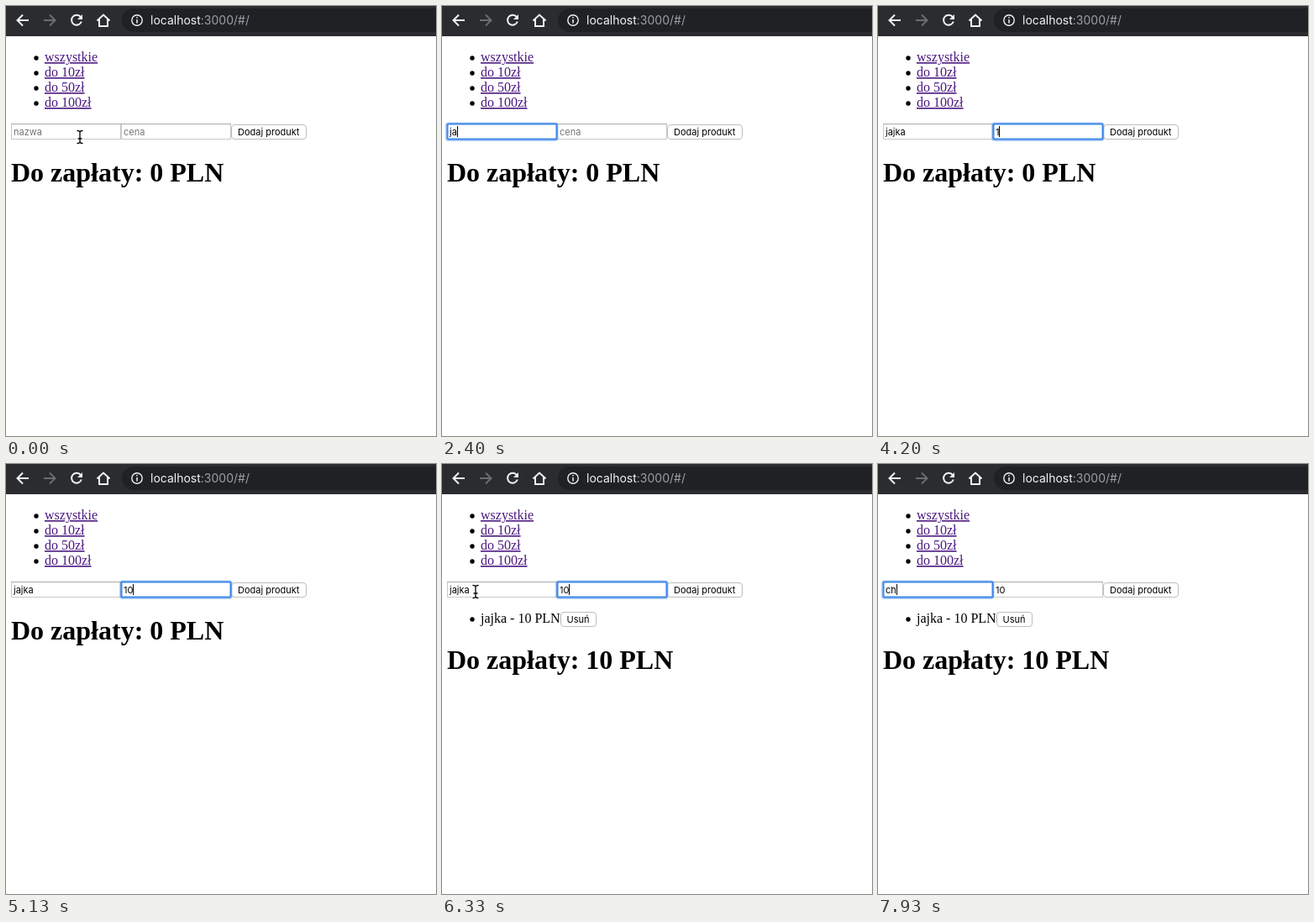
Write an HTML page that moves like this. It is 512 px wide and 512 px high and loops after 8 s.

```html
<!DOCTYPE html>
<html lang="pl">
<head>
<meta charset="utf-8">
<style>
  html, body { margin: 0; width: 100%; height: 100%; overflow: hidden; background: #fff; }
  svg { display: block; width: 512px; height: 512px; }
  .page { font: 16px "Liberation Serif", serif; }
  .links { fill: #4b1880; text-decoration: underline; }
  h1, .total { font: bold 32px "Liberation Serif", serif; }
  .ui { font: 11px Inter, sans-serif; }
  .url { font: 14px Inter, sans-serif; fill: #9aa0a6; }
  .icon { fill: none; stroke: #f1f3f4; stroke-width: 2; }
  .button { fill: #fff; stroke: #bdbdbd; }
</style>
</head>
<body>
<svg viewBox="0 0 512 512">
  <rect width="512" height="36" fill="#2b2c30"/>
  <rect x="138" y="3" width="400" height="28" rx="14" fill="#202124"/>
  <g class="icon">
    <path d="M27 17H14M20 10.5L13.5 17L20 23.5"/>
    <path d="M45 17H58M52 10.5L58.5 17L52 23.5" stroke="#6c6d71"/>
    <path d="M89 13.2A6 6 0 1 0 89.8 18.5"/>
    <path d="M91 10V16H85Z" fill="#f1f3f4" stroke="none"/>
    <path d="M108.500 17.500L116 10.500L123.500 17.500M111 16V24H121V16"/>
    <circle cx="156" cy="17" r="6.200" stroke-width="1.400"/>
    <path d="M156 16V20.500M156 13V14.600" stroke-width="1.500"/>
  </g>
  <text class="url" x="172" y="22"><tspan fill="#f1f3f4">localhost</tspan>:3000/#/</text>

  <g class="page">
    <g class="links">
      <text x="46" y="66">wszystkie</text>
      <text x="46" y="84">do 10zł</text>
      <text x="46" y="102">do 50zł</text>
      <text x="46" y="120">do 100zł</text>
    </g>
    <circle cx="36" cy="62" r="2.700"/>
    <circle cx="36" cy="80" r="2.700"/>
    <circle cx="36" cy="98" r="2.700"/>
    <circle cx="36" cy="116" r="2.700"/>
    <g id="item">
      <circle cx="36" cy="185" r="2.700"/>
      <text x="46" y="189">jajka - 10 PLN</text>
      <rect class="button" x="141.500" y="176.500" width="42" height="17" rx="3.500"/>
      <text class="ui" x="148.500" y="189">Usuń</text>
    </g>
  </g>
  <text id="total" class="total" x="6"></text>

  <g class="ui">
    <g fill="none" stroke="#c8c8c8">
      <rect x="6.500" y="140.500" width="130" height="18"/>
      <rect x="137.500" y="140.500" width="130" height="18"/>
      <path d="M6 140.500H268" stroke="#a9a9a9"/>
    </g>
    <rect class="button" x="268.500" y="141.500" width="89" height="17" rx="3.500"/>
    <text x="276" y="154">Dodaj produkt</text>
    <g id="ring" fill="none" stroke="#3f87e8">
      <rect x="6" y="140.500" width="130.500" height="18.500" rx="1.500" stroke-width="4" opacity=".4"/>
      <rect x="6.500" y="140.500" width="130" height="18" rx="1" fill="#fff" stroke-width="2"/>
    </g>
    <rect id="selection" y="143" height="13" fill="#b3d7fe"/>
    <text id="name" x="9" y="154"></text>
    <text id="price" x="140" y="154"></text>
    <rect id="caret" y="143" width="1" height="13"/>
  </g>
  <g id="pointer" fill="none" stroke-linecap="round">
    <path id="beam" d="M-3 -7.500Q0 -7.500 0 -5.500Q0 -7.500 3 -7.500M0 -5.500V5.500M-3 7.500Q0 7.500 0 5.500Q0 7.500 3 7.500M-2 2H2" stroke="#fff" stroke-width="3"/>
    <use href="#beam"/>
    <path d="M-3 -7.500Q0 -7.500 0 -5.500Q0 -7.500 3 -7.500M0 -5.500V5.500M-3 7.500Q0 7.500 0 5.500Q0 7.500 3 7.500M-2 2H2" stroke="#000" stroke-width="1.300"/>
  </g>
</svg>
<script>
const $ = id => document.getElementById(id);
const LOOP = 8000, ADDED = 5400;

// [time, focused field, name, price, selection start]
const states = [
  [0, '', '', ''],
  [930, 'name', '', ''],
  [1930, 'name', 'j', ''],
  [2270, 'name', 'ja', ''],
  [2530, 'name', 'jaj', ''],
  [2670, 'name', 'jajk', ''],
  [2800, 'name', 'jajka', ''],
  [3400, 'price', 'jajka', ''],
  [3930, 'price', 'jajka', '1'],
  [4870, 'price', 'jajka', '10'],
  [6400, 'name', 'jajka', '10'],
  [6600, 'name', 'jajka', '10', 4],
  [6670, 'name', 'jajka', '10', 3],
  [6800, 'name', 'jajka', '10', 0],
  [7470, 'name', 'c', '10'],
  [7730, 'name', 'ch', '10']
];

// [time, x, y]
const path = [
  [0, 88, 156], [800, 89, 158], [6000, 89, 158], [6330, 40, 152],
  [6530, 36, 150], [6730, 10, 146], [6870, 8, 148], [8000, 8, 148]
];

function pointerAt(t) {
  const i = path.findIndex(p => p[0] > t);
  const [a, b] = [path[i - 1], path[i]];
  const k = (t - a[0]) / (b[0] - a[0]);
  return [a[1] + (b[1] - a[1]) * k, a[2] + (b[2] - a[2]) * k];
}

const show = (id, on) => $(id).setAttribute('visibility', on ? 'visible' : 'hidden');

function setField(id, value, hint) {
  $(id).textContent = value || hint;
  $(id).setAttribute('fill', value ? '#000' : '#757575');
}

function draw(t) {
  const [start, focus, name, price, from] = states.findLast(s => s[0] <= t);
  setField('name', name, 'nazwa');
  setField('price', price, 'cena');

  show('ring', focus);
  $('ring').setAttribute('transform', `translate(${focus === 'price' ? 131 : 0})`);

  const selecting = from !== undefined;
  show('selection', selecting);
  if (selecting) {
    const left = from ? $('name').getSubStringLength(0, from) : 0;
    $('selection').setAttribute('x', 9 + left);
    $('selection').setAttribute('width', $('name').getComputedTextLength() - left);
  }

  const value = focus === 'price' ? price : name;
  const phase = (t - start) % 1000 < 500;
  show('caret', focus && !selecting && (start === 930 ? !phase : phase));
  if (focus) {
    const width = value ? $(focus).getComputedTextLength() : 0;
    $('caret').setAttribute('x', Math.round((focus === 'price' ? 140 : 9) + width));
  }

  const added = t >= ADDED;
  show('item', added);
  $('total').textContent = `Do zapłaty: ${added ? 10 : 0} PLN`;
  $('total').setAttribute('y', added ? 244 : 209);

  show('pointer', t < 1930 || (t >= 6000 && t < 7470));
  $('pointer').setAttribute('transform', `translate(${pointerAt(t)})`);
}

function tick() {
  draw(performance.now() % LOOP);
  requestAnimationFrame(tick);
}
tick();
</script>
</body>
</html>
```
